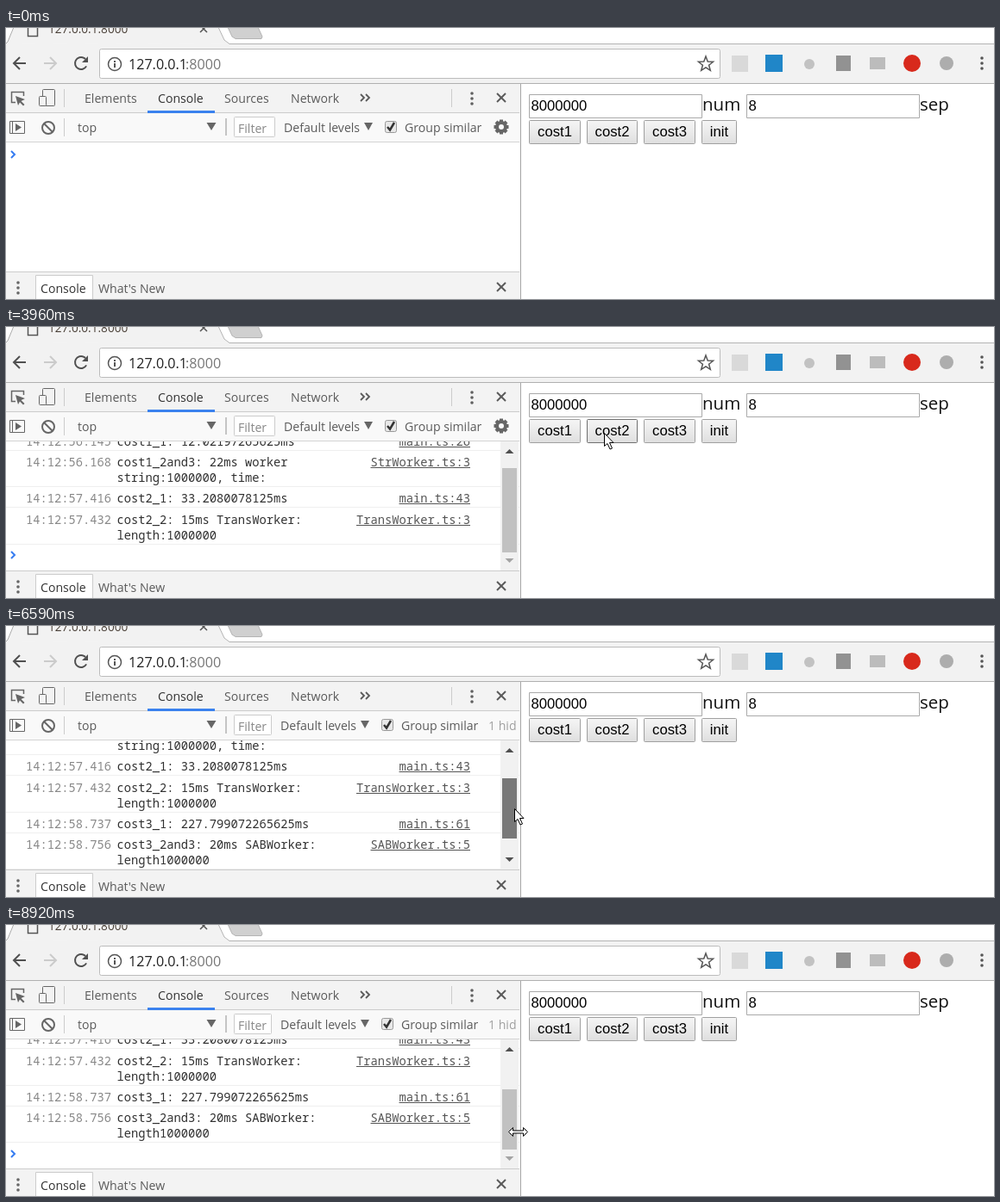
Animation, 1145 px wide and 315 px high, one loop 8990 ms. Source, as an HTML page with a canvas:

```html
<!DOCTYPE html>
<html lang="en">
<head>
<meta charset="utf-8">
<title>Worker cost demo</title>
<style>
  html, body { margin: 0; width: 100%; height: 100%; overflow: hidden; background: #fff; }
  canvas { display: block; }
</style>
</head>
<body>
<canvas id="stage" width="1145" height="315"></canvas>
<script>
const ctx = document.getElementById('stage').getContext('2d', { alpha: false });
const LOOP = 8990;
const UI = '"Open Sans", "Noto Sans", sans-serif';
const MONO = '"Noto Sans Mono", "DejaVu Sans Mono", monospace';
const ARIAL = '"Liberation Sans", Arial, sans-serif';

// ---------- drawing helpers ----------
function rect(x, y, w, h, color) {
  ctx.fillStyle = color;
  ctx.fillRect(x, y, w, h);
}
function frame(x, y, w, h, border, fill, radius = 0) {
  ctx.beginPath();
  ctx.roundRect(x + .5, y + .5, w - 1, h - 1, radius);
  ctx.fillStyle = fill;
  ctx.fill();
  ctx.lineWidth = 1;
  ctx.strokeStyle = border;
  ctx.stroke();
}
function path(points, { fill, stroke, width = 1, close = false }) {
  ctx.beginPath();
  points.forEach(([x, y]) => ctx.lineTo(x, y));
  if (close) ctx.closePath();
  if (fill) { ctx.fillStyle = fill; ctx.fill(); }
  if (stroke) { ctx.strokeStyle = stroke; ctx.lineWidth = width; ctx.stroke(); }
}
function disc(x, y, r, color) {
  ctx.beginPath();
  ctx.arc(x, y, r, 0, 7);
  ctx.fillStyle = color;
  ctx.fill();
}
function ring(x, y, r, color, width, from = 0, to = Math.PI * 2) {
  ctx.beginPath();
  ctx.arc(x, y, r, from, to);
  ctx.strokeStyle = color;
  ctx.lineWidth = width;
  ctx.stroke();
}
function text(str, x, y, size, family, color, align = 'left') {
  ctx.font = `${size}px ${family}`;
  ctx.fillStyle = color;
  ctx.textAlign = align;
  ctx.fillText(str, x, y);
}
const label = (str, x, y, color = '#5a5a5a') => text(str, x, y, 14.1, UI, color);
function cross(x, y, r, color, width) {
  path([[x - r, y - r], [x + r, y + r]], { stroke: color, width });
  path([[x + r, y - r], [x - r, y + r]], { stroke: color, width });
}
function dots(x, y, gap, color) {
  for (const d of [-gap, 0, gap]) disc(x, y + d, 1.8, color);
}
function triangle(x, y, w, h, color) {
  path([[x - w, y - h], [x + w, y - h], [x, y + h]], { fill: color });
}
function chevron(x, y, r, color, width) {
  path([[x - r, y - r], [x, y], [x - r, y + r]], { stroke: color, width });
}

// ---------- pointer timeline ----------
const smooth = p => p * p * (3 - 2 * p);
const easeOut = p => 1 - (1 - p) ** 2;
const easeIn = p => p ** 1.3;
const START = [1070, 325];
const MOVES = [
  { at: 230, end: 1000, steps: 11, to: [827, 123], ease: easeOut },
  { at: 1550, end: 2090, steps: 8, to: [626, 122], dip: 20, ease: smooth },
  { at: 2720, end: 3330, steps: 9, to: [690, 123], ease: smooth },
  { at: 3960, end: 4490, steps: 8, to: [760, 122], ease: smooth },
  { at: 5200, end: 5660, steps: 7, to: [592, 226], dip: 8, ease: easeOut },
  { at: 5810, end: 6040, steps: 4, to: [589, 226], ease: smooth },
  { at: 6350, end: 7130, steps: 11, to: [591, 174], ease: easeIn },
  { at: 8140, end: 8920, steps: 11, to: [593, 240], ease: smooth }
];
function pointerAt(t) {
  let [x, y] = START;
  for (const { at, end, steps, to, dip = 0, ease } of MOVES) {
    if (t < at) break;
    const step = Math.min(steps - 1, Math.floor((t - at) / (end - at) * (steps - 1) + 1e-6));
    const p = ease((step + 1) / steps);
    x += (to[0] - x) * p;
    y += (to[1] - y) * p + dip * Math.sin(Math.PI * p);
  }
  return [Math.floor(x), Math.round(y)];
}

// ---------- browser chrome ----------
function drawStar(x, y, r) {
  const pts = Array.from({ length: 10 }, (_, i) => {
    const a = i * Math.PI / 5 - Math.PI / 2, d = i % 2 ? r * .42 : r;
    return [x + d * Math.cos(a), y + d * Math.sin(a)];
  });
  path(pts, { stroke: '#555', width: 1.5, close: true });
}
function drawArrow(x, y, dir, color) {
  path([[x - 7 * dir, y], [x + 7 * dir, y]], { stroke: color, width: 2 });
  path([[x, y - 7], [x + 7 * dir, y], [x, y + 7]], { stroke: color, width: 2 });
}
function drawBrowser() {
  rect(0, 0, 1145, 19, '#fff');
  rect(0, 18, 1145, 47, '#f2f2f2');
  path([[0, 18], [2, 16], [9, 0], [246, 0], [254, 15], [258, 18.5]], { fill: '#f2f2f2' });
  path([[0, 18], [2, 16], [9, -1]], { stroke: '#aaa' });
  path([[246, -1], [253, 14], [259, 18.5], [1145, 18.5]], { stroke: '#b4b4b4' });
  path([[257, -1], [262, 10], [266, 12.5], [296, 12.5], [297, 10], [292, -1]], { fill: '#d0d0d0', stroke: '#b4b4b4' });
  path([[25.5, -2], [25.5, 9.5], [36.5, 9.5], [36.5, -2]], { stroke: '#555', width: 1.5 });
  text('127.0.0.1:8000', 49, 6, 13.6, UI, '#4a4038');
  cross(229, 1, 4, '#555', 1.5);

  drawArrow(16, 41, -1, '#505050');
  drawArrow(51, 41, 1, '#cbcbcb');
  ring(87, 41, 7, '#505050', 2, .5, 5.5);
  path([[95, 33], [95, 40], [88, 40]], { fill: '#505050' });
  frame(108, 24, 720, 35, '#bcbcbc', '#fff', 2);
  ring(126, 42, 7.5, '#555', 1.5);
  rect(125, 41, 2, 5, '#555');
  rect(125, 38, 2, 2, '#555');
  text('127.0.0.1', 142, 48, 16.1, UI, '#222');
  text(':8000', 208, 48, 16.1, UI, '#777');
  drawStar(811, 42, 9);

  rect(841, 32, 19, 19, '#d9d9d9');
  rect(880, 31, 20, 20, '#2086c8');
  disc(931, 42, 6, '#c2c2c2');
  rect(962, 32, 17, 18, '#929292');
  rect(1001, 34, 18, 14, '#bcbcbc');
  disc(1050, 41, 10, '#d8291c');
  disc(1090, 41, 8, '#adadad');
  dots(1131, 41, 6, '#555');
  rect(0, 64, 1145, 1, '#b0b0b0');
}

// ---------- developer tools ----------
function drawGear(x, y) {
  for (let i = 0; i < 8; i++) {
    const a = i * Math.PI / 4, c = Math.cos(a), s = Math.sin(a);
    path([[x + 5 * c, y + 5 * s], [x + 8.5 * c, y + 8.5 * s]], { stroke: '#666', width: 4 });
  }
  ring(x, y, 5, '#666', 4);
}
function drawTools(hiddenCount) {
  rect(0, 65, 595, 33, '#f3f3f3');
  rect(0, 98, 595, 1, '#ccc');
  rect(0, 99, 595, 33, '#f9f9f9');
  rect(0, 132, 595, 1, '#d4d4d4');

  path([[20.5, 79], [20.5, 74.5], [6.5, 74.5], [6.5, 86.5], [11, 86.5]], { stroke: '#666', width: 1.5 });
  path([[11, 79], [22, 83], [17.5, 85], [21.5, 89], [20, 90.5], [16, 86.5], [14, 90]], { fill: '#666' });
  frame(42, 71, 15, 20, '#666', '#f3f3f3', 1);
  frame(38, 79, 9, 12, '#666', '#f3f3f3', 1);
  rect(67, 71, 1, 21, '#ccc');
  label('Elements', 91, 87);
  label('Console', 176, 87, '#333');
  label('Sources', 253, 87);
  label('Network', 330, 87);
  rect(164, 96, 78, 3, '#3b82ee');
  chevron(415, 81, 4, '#5a5a5a', 1.8);
  chevron(421, 81, 4, '#5a5a5a', 1.8);
  rect(516, 71, 1, 21, '#ccc');
  dots(540, 82, 6, '#5f5f5f');
  cross(574, 81, 5, '#5a5a5a', 2);

  frame(4, 108, 18, 15, '#666', '#f9f9f9');
  rect(7, 108, 1, 15, '#666');
  path([[11, 111], [18, 115.5], [11, 120]], { fill: '#666' });
  ring(49, 116, 7, '#666', 2);
  path([[44, 111], [54, 121]], { stroke: '#666', width: 2 });
  rect(67, 105, 1, 21, '#ccc');
  label('top', 83, 121);
  triangle(238, 114.5, 5.5, 4.5, '#666');
  rect(254, 105, 2, 20, '#c4c4c4');

  const shift = hiddenCount ? -4 : 0;
  frame(264, 103, 48 + shift, 24, '#ccc', '#fff', 1);
  label('Filter', 269, 122, '#888');
  label('Default levels', 322 + shift, 121);
  triangle(420 + shift, 114.5, 5, 4.5, '#666');
  frame(439 + shift, 108, 14, 14, '#999', '#e8e8e8', 2);
  path([[442 + shift, 115], [445 + shift, 118.5], [450 + shift, 110]], { stroke: '#333', width: 2.5 });
  label('Group similar', 462 + shift, 121);
  if (hiddenCount) label('1 hid', 559, 121, '#a0a0a0');
  else drawGear(574, 115);
}
function drawDrawer() {
  rect(0, 283, 595, 32, '#f3f3f3');
  rect(0, 283, 595, 1, '#ccc');
  dots(14, 302, 6, '#666');
  frame(34, 287, 67, 40, '#ccc', '#fff');
  label('Console', 40, 308, '#333');
  label("What's New", 107, 308);
  cross(574, 301, 5, '#5a5a5a', 2);
  rect(595, 65, 1, 250, '#f3f3f3');
  rect(596, 65, 1, 250, '#a8a8a8');
}

// ---------- console ----------
const LOGS = [
  { y: 148, time: '14:12:56.145', lines: ['cost1_1: 12.02197265625ms'], link: 'main.ts:26' },
  { y: 172, time: '14:12:56.168', lines: ['cost1_2and3: 22ms worker', 'string:1000000, time:'], link: 'StrWorker.ts:3' },
  { y: 214, time: '14:12:57.416', lines: ['cost2_1: 33.2080078125ms'], link: 'main.ts:43' },
  { y: 239, time: '14:12:57.432', lines: ['cost2_2: 15ms TransWorker:', 'length:1000000'], link: 'TransWorker.ts:3' },
  { y: 281, time: '14:12:58.737', lines: ['cost3_1: 227.799072265625ms'], link: 'main.ts:61' },
  { y: 305, time: '14:12:58.756', lines: ['cost3_2and3: 20ms SABWorker:', 'length1000000'], link: 'SABWorker.ts:5' }
];
const CARET_Y = [147, 214, 280, 347];
const MAX_SCROLL = 81, TRAVEL = 37, GRAB_Y = 226;

function drawScrollbar(top, height, color, atTop, atEnd) {
  rect(573, 133, 21, 150, '#f1f1f1');
  rect(575, top, 17, height, color);
  triangle(583.5, 144.5, 5, -2.5, atTop ? '#a3a3a3' : '#505050');
  triangle(583.5, 271.5, 5, 2.5, atEnd ? '#a3a3a3' : '#505050');
}
function drawConsole(runs, scroll, focused, thumbColor) {
  const right = runs > 1 ? 538 : 559;
  ctx.save();
  ctx.beginPath();
  ctx.rect(0, 133, 595, 150);
  ctx.clip();
  rect(0, 133, 595, 150, '#fff');
  for (const { y, time, lines, link } of LOGS.slice(0, runs * 2)) {
    const base = y + 5 - scroll;
    text(time, 23, base, 13.75, MONO, '#888');
    lines.forEach((line, i) => text(line, 128.5, base + 18 * i, 13.75, MONO, '#303030'));
    text(link, right, base, 13.75, MONO, '#545454', 'right');
    const width = link.length * 8.25;
    rect(right - width, base + 1, width, 1, '#545454');
    rect(0, base + 5 + 18 * (lines.length - 1), 595, 1, '#efefef');
  }
  chevron(10, CARET_Y[runs] - scroll, 4, focused ? '#367cf1' : '#8a8a8a', 2);
  if (runs === 2) drawScrollbar(164, 98, thumbColor, false, true);
  if (runs === 3) {
    drawScrollbar(154 + Math.round(TRAVEL * scroll / MAX_SCROLL), 70, thumbColor, scroll === 0, scroll === MAX_SCROLL);
  }
  ctx.restore();
}

// ---------- page ----------
const BUTTONS = [
  { name: 'cost1', x: 606, w: 60, press: [2240, 2340] },
  { name: 'cost2', x: 673, w: 59, press: [3480, 3560] },
  { name: 'cost3', x: 739, w: 60, press: [4800, 4890] },
  { name: 'init', x: 806, w: 41, press: [1230, 1550] }
];
function drawPage(t, [px, py]) {
  rect(597, 65, 548, 250, '#fff');
  frame(606, 77, 201, 28, '#a9a9a9', '#fff');
  frame(858, 77, 201, 28, '#a9a9a9', '#fff');
  text('8000000', 608.5, 96, 16.67, ARIAL, '#000');
  text('8', 860.5, 96, 16.67, ARIAL, '#000');
  text('num', 807, 96, 20.5, UI, '#111');
  text('sep', 1059, 96, 20.5, UI, '#111');
  for (const { name, x, w, press } of BUTTONS) {
    const hover = t >= 230 && px >= x && px < x + w && py >= 107 && py < 135;
    const pressed = t >= press[0] && t < press[1];
    const shade = ctx.createLinearGradient(0, 107, 0, 135);
    shade.addColorStop(0, pressed ? '#dcdcdc' : '#f6f6f6');
    shade.addColorStop(1, pressed ? '#eee' : '#dedede');
    frame(x, 107, w, 28, hover ? '#707070' : '#a0a0a0', shade, 1);
    text(name, x + w / 2, 126, 16.67, ARIAL, '#000', 'center');
  }
}

function drawPointer(x, y, resizing) {
  ctx.save();
  ctx.translate(x + .5, y + .5);
  ctx.lineJoin = 'miter';
  const style = { fill: '#fff', stroke: '#000', close: true };
  if (resizing) {
    const half = [[-11, 0], [-6, -5], [-6, -1.5], [6, -1.5], [6, -5], [11, 0]];
    path([...half, [6, 5], [6, 1.5], [-6, 1.5], [-6, 5]], style);
  } else {
    path([[0, 0], [0, 15], [3.5, 12], [6.5, 18.5], [9, 17.5], [6, 11], [10.5, 11]], style);
  }
  ctx.restore();
}

function render(t) {
  const pointer = pointerAt(t), [x, y] = pointer;
  const runs = t < 2340 ? 0 : t < 3560 ? 1 : t < 4890 ? 2 : 3;
  const dragging = t >= 6040 && t < 8920;
  const hovering = t >= 5810 && t < 8920;
  const offset = dragging ? Math.min(TRAVEL, Math.max(0, GRAB_Y - y)) : 0;
  const scroll = runs === 3 ? Math.ceil(MAX_SCROLL * (1 - offset / TRAVEL)) : runs === 2 ? 15 : 0;
  const thumbColor = dragging ? '#787878' : hovering ? '#a8a8a8' : '#c1c1c1';
  const focused = t < 4890 || t >= 6350;

  drawBrowser();
  drawTools(runs === 3);
  drawConsole(runs, scroll, focused, thumbColor);
  drawDrawer();
  drawPage(t, pointer);
  if (t >= 230) drawPointer(x, y, !dragging && x >= 592 && x <= 600);
}

const begun = performance.now();
function tick() {
  render((performance.now() - begun) % LOOP);
  requestAnimationFrame(tick);
}
tick();
</script>
</body>
</html>
```
